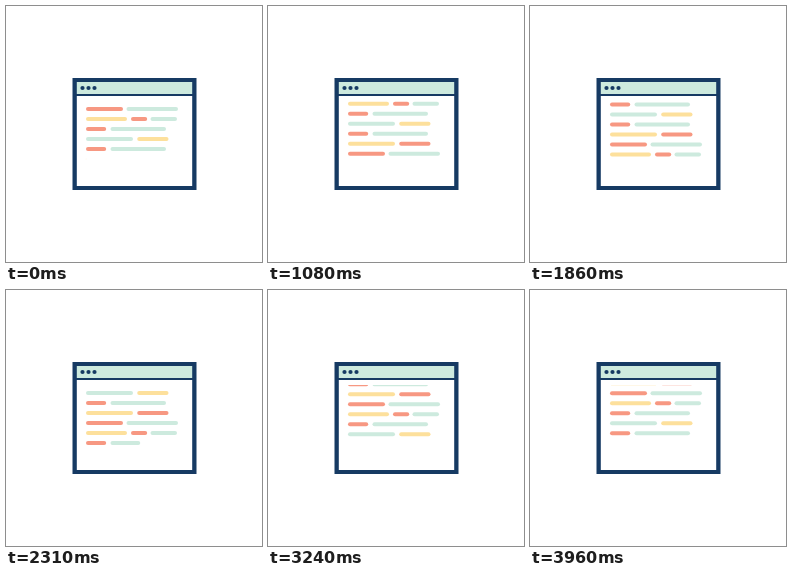
Recreate the animation shown at these times as an HTML page with a canvas. Size 256 by 256 pixels, loop 3.99 s.

```html
<!DOCTYPE html>
<html lang="en">
<head>
<meta charset="utf-8">
<title>Code window</title>
<style>
  html, body { margin: 0; width: 100%; height: 100%; overflow: hidden; background: #fff; }
  canvas { display: block; width: 100vw; height: 100vh; }
</style>
</head>
<body>
<canvas id="stage"></canvas>
<script>
const SIZE = 256;
const LOOP = 3990;
const NAVY = '#163a63', MINT = '#cdeade', SALMON = '#f79882', YELLOW = '#fde09c';

const ROW_GAP = 10, TOP_Y = 103, SHOWN = 5, BAR = 4;
const CLIP = { top: 95, bottom: 156 };
const INNER = { x: 70.8, w: 115.4 };
const SCROLL = 270;

// Each bar: colour, left edge, right edge
const wide = [[SALMON, 80, 117], [MINT, 120.5, 172]];
const triple = [[YELLOW, 80, 121], [SALMON, 125, 141.2], [MINT, 144.5, 171]];
const short = [[SALMON, 80, 100.2], [MINT, 104.5, 160]];
const pale = [[MINT, 80, 127], [YELLOW, 131.2, 162.5]];
const warm = [[YELLOW, 80, 127], [SALMON, 131.2, 162.5]];
const rows = [wide, triple, short, pale, short, warm];

// A step waits, types one new row, then scrolls until its end time
const ends = [568, 1212, 2005, 2708, 3306, LOOP];
const waits = [0, 0, 60, 60, 30, 90];

const canvas = document.getElementById('stage');
const ctx = canvas.getContext('2d');

const clamp = v => Math.min(1, Math.max(0, v));
const easeInOut = u => (1 - Math.cos(Math.PI * u)) / 2;
const rowLength = row => row.reduce((sum, [, a, b]) => sum + b - a, 0);

function resize() {
  const dpr = window.devicePixelRatio || 1;
  canvas.width = Math.round(innerWidth * dpr);
  canvas.height = Math.round(innerHeight * dpr);
}

function stateAt(t) {
  const step = ends.findIndex(end => t < end);
  const start = step ? ends[step - 1] : 0;
  const typeFrom = start + waits[step];
  const scrollFrom = ends[step] - SCROLL;
  return {
    step,
    typed: clamp((t - typeFrom) / (scrollFrom - typeFrom)),
    shift: easeInOut(clamp((t - scrollFrom) / SCROLL))
  };
}

function rect(color, x, y, w, h) {
  ctx.fillStyle = color;
  ctx.fillRect(x, y, w, h);
}

function drawBar(color, x, y, width) {
  const r = Math.min(BAR, width) / 2;
  ctx.strokeStyle = color;
  ctx.lineWidth = r * 2;
  ctx.beginPath();
  ctx.moveTo(x + r, y);
  ctx.lineTo(x + Math.max(width - r, r + 0.01), y);
  ctx.stroke();
}

function drawRow(row, y, part) {
  let left = rowLength(row) * part;
  for (const [color, a, b] of row) {
    if (left <= 0) return;
    drawBar(color, a, y, Math.min(left, b - a));
    left -= b - a;
  }
}

function drawWindow() {
  rect(NAVY, 66.5, 72, 124, 112);
  rect(MINT, INNER.x, 76, INNER.w, 12);
  rect('#fff', INNER.x, 90, INNER.w, 90);
  ctx.fillStyle = NAVY;
  for (const x of [76.5, 82.5, 88.5]) {
    ctx.beginPath();
    ctx.arc(x, 82, 2.1, 0, Math.PI * 2);
    ctx.fill();
  }
}

function drawCode(t) {
  const { step, typed, shift } = stateAt(t);
  ctx.save();
  ctx.beginPath();
  ctx.rect(INNER.x, CLIP.top, INNER.w, CLIP.bottom - CLIP.top);
  ctx.clip();
  ctx.lineCap = 'round';
  for (let i = 0; i <= SHOWN; i++) {
    const y = TOP_Y + ROW_GAP * (i - shift);
    drawRow(rows[(step + i) % rows.length], y, i === SHOWN ? typed : 1);
  }
  ctx.restore();
}

function frame() {
  const t = performance.now() % LOOP;
  ctx.setTransform(canvas.width / SIZE, 0, 0, canvas.height / SIZE, 0, 0);
  rect('#fff', 0, 0, SIZE, SIZE);
  drawWindow();
  drawCode(t);
  requestAnimationFrame(frame);
}

addEventListener('resize', resize);
resize();
frame();
</script>
</body>
</html>
```
